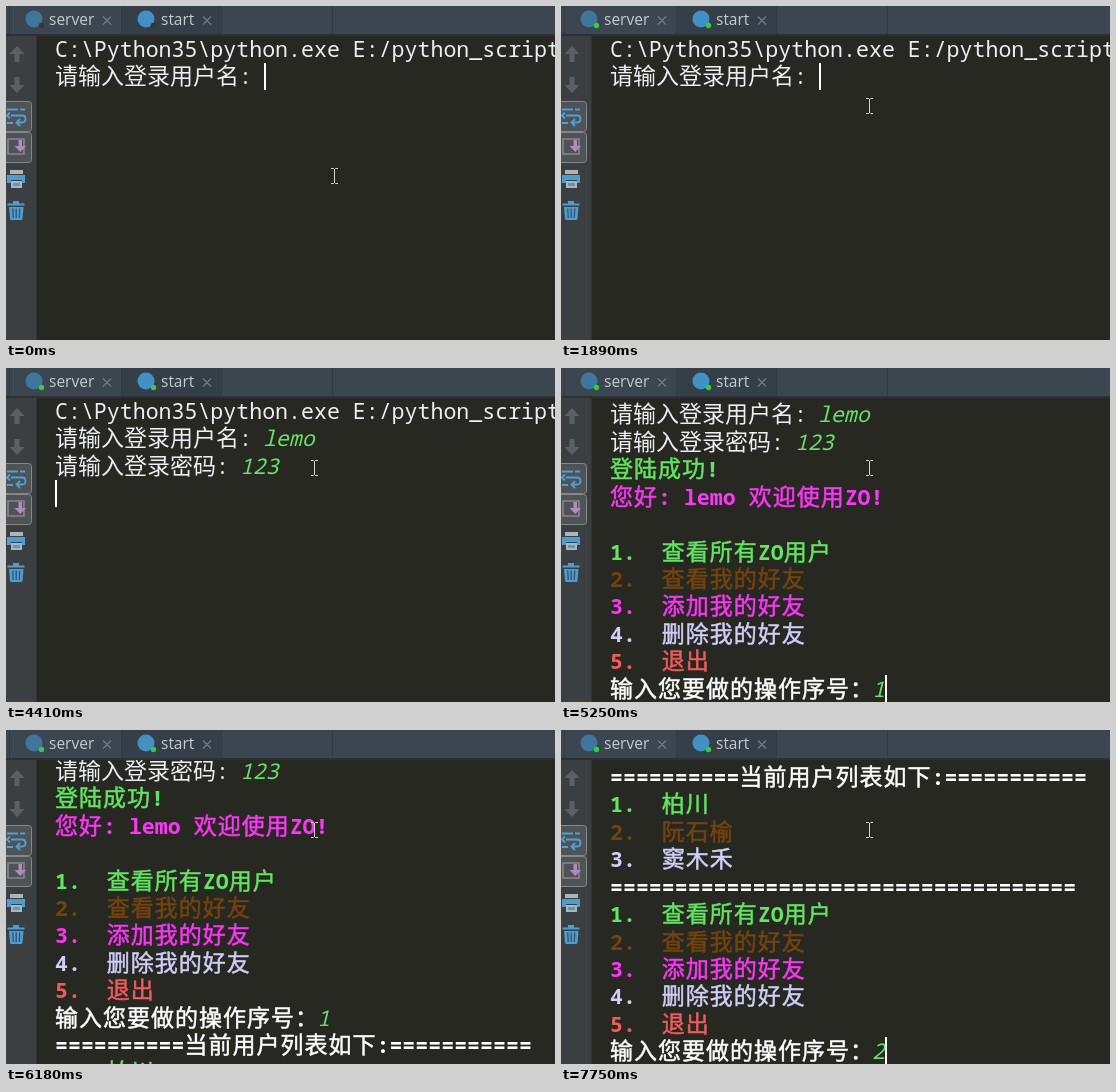
These frames come from a looping animation (549x334 px, 8 s). An HTML page:

```html
<!DOCTYPE html>
<html lang="zh-CN">
<head>
<meta charset="utf-8">
<title>Console session</title>
<style>
  html, body { margin: 0; width: 100%; height: 100%; overflow: hidden; background: #272822; }
  #stage { position: relative; width: 549px; height: 334px; overflow: hidden; background: #272822; }
  #stage svg { position: absolute; left: 0; top: 0; }
  #tabs text { font: 15.5px "Open Sans", "Noto Sans", sans-serif; fill: #c6cbce; }
  #console { position: absolute; left: 31px; top: 30px; right: 0; bottom: 0; overflow: hidden; }
  .page { position: absolute; left: 18px; top: -1px; }
  .line {
    position: absolute; left: 0; height: 27.42px; line-height: 27.42px; white-space: pre;
    font-family: "Noto Sans Mono", "DejaVu Sans Mono", monospace; font-size: 21.58px; color: #eceef4;
  }
  .cjk {
    font-family: "Noto Sans CJK SC", "Noto Sans CJK JP", "Noto Sans CJK", sans-serif;
    font-size: 23px; line-height: 0;
  }
  .bold { font-weight: 700; }
  .bold .cjk { letter-spacing: 1px; font-weight: 400; -webkit-text-stroke: 0.5px; }
  .line i { position: relative; left: -2px; color: #68e068; font-weight: 400; }
  .green { color: #62e562; }
  .brown { color: #74430d; }
  .pink { color: #fb37f6; }
  .lilac { color: #cfcff8; }
  .red { color: #f05c5c; }
  .white { color: #fff; }
  #caret { position: absolute; width: 2px; height: 27px; background: #fff; }
</style>
</head>
<body>
<div id="stage">
  <svg id="tabs" width="549" height="334">
    <rect width="549" height="29" fill="#3b4650"/>
    <rect id="active" y="0" height="28" fill="#343f49"/>
    <path d="M3.5 0V28M115.5 0V28M215.5 0V28M326.5 0V28" stroke="#303a42"/>
    <rect y="28" width="549" height="2" fill="#2b3136"/>
    <g class="icon"><circle cx="28" cy="13" r="8.5" fill="#4390c4"/></g>
    <g class="icon"><circle cx="140" cy="13" r="8.5" fill="#4390c4"/></g>
    <circle class="dot" cx="35.5" cy="19.5" r="2.7"/>
    <circle class="dot" cx="147.5" cy="19.5" r="2.7"/>
    <text x="43" y="19">server</text>
    <text x="155" y="19">start</text>
    <path d="M97 10.5l8 8m0-8l-8 8M197 10.5l8 8m0-8l-8 8" stroke="#73797e" stroke-width="1.3"/>

    <rect y="30" width="30" height="304" fill="#3c3f41"/>
    <rect x="30" y="30" width="1" height="304" fill="#313335"/>
    <g fill="#5d6062">
      <path d="M11 40l7.5 8h-5v8h-5v-8h-5z"/>
      <path d="M11 87l7.5-8h-5v-8h-5v8h-5z"/>
    </g>
    <g fill="#505355" stroke="#85888a">
      <rect x="-3.5" y="95.5" width="29" height="30" rx="3"/>
      <rect x="-3.5" y="126.5" width="29" height="30" rx="3"/>
    </g>
    <g fill="none" stroke="#4fa0d8" stroke-width="1.8">
      <path d="M1 103.5h11M14 103.5h5M5 109.500h11q3.500 0 3.500 3.500t-3.500 3.500h-4M1 117h6"/>
      <path d="M4 106.500l-3 3 3 3M14 113l-3.500 3.500 3.500 3.500"/>
    </g>
    <path d="M2 133h16v15H2z" fill="none" stroke="#85888a" stroke-width="1.6"/>
    <path d="M12.500 134h3.500v6h4l-5.700 6-5.800-6h4z" fill="#b18abf"/>
    <g fill="#4e9dd2">
      <path d="M4 164h13v4H4z" fill="#aeb4b8"/>
      <path d="M1 169h18v8h-3v-3H5v3H1z"/>
      <path d="M5 175h11v7H5z" fill="#aeb4b8"/>
      <path d="M7 177h7v3H7z"/>
      <path d="M1.500 197.500h17v2h-17zM7 195h6v2.500H7zM3 201h14.500l-1 11.500q-.2 1.500-1.500 1.500H5.500q-1.300 0-1.500-1.500z"/>
    </g>
    <path d="M6.800 202.500l.4 9.500M10.200 202.500v9.500M13.700 202.500l-.4 9.500" stroke="#34536a" stroke-width="1.3"/>
  </svg>

  <div id="console">
    <div class="page" id="server"></div>
    <div class="page" id="start"></div>
    <div id="caret"></div>
  </div>

  <svg width="549" height="334">
    <path id="arrow" d="M0 0V16.5L3.8 13 6.500 19 9.300 17.800 6.700 12H12z" fill="#fff" stroke="#222" stroke-width=".8"/>
    <path id="beam" d="M-3-7.500h2.500l1 1 1-1H4M.5-7V7M-3 7.500h2.500l1-1 1 1H4" fill="none" stroke="#d4d4d0"/>
  </svg>
</div>

<script>
const LOOP = 8000, ROW = 27.42;
const $ = id => document.getElementById(id);

const path = ['', 'C:\\Python35\\python.exe E:/python_scripts/chat'];
const menu = [
  ['bold green', '1.  查看所有ZO用户'],
  ['bold brown', '2.  查看我的好友'],
  ['bold pink', '3.  添加我的好友'],
  ['bold lilac', '4.  删除我的好友'],
  ['bold red', '5.  退出']
];
const ask = id => ['bold white', '输入您要做的操作序号：', id];

const startLines = [
  path,
  ['', '请输入登录用户名: ', 'user'],
  ['', '请输入登录密码: ', 'pass'],
  ['bold green', '登陆成功!'],
  ['bold pink', '您好: lemo 欢迎使用ZO!'],
  ['', ''],
  ...menu,
  ask('pick1'),
  ['bold white', '='.repeat(10) + '当前用户列表如下:' + '='.repeat(11)],
  ['bold green', '1.  柏川'],
  ['bold brown', '2.  阮石榆'],
  ['bold lilac', '3.  窦木禾'],
  ['bold white', '='.repeat(36)],
  ...menu,
  ask('pick2')
];

function fill(page, lines) {
  page.innerHTML = lines.map(([cls, text, id], i) => {
    const body = text.replace(/[\u3000-\u9fff\uff00-\uffef]+/g, '<span class="cjk">$&</span>');
    const input = id ? `<i id="${id}"></i>` : '';
    return `<div class="line ${cls}" style="top:${i * ROW}px">${body}${input}</div>`;
  }).join('');
}
fill($('server'), [path, ['bold green', '正在等待对方回复...']]);
fill($('start'), startLines);
const rows = [...$('start').children];

// Each entry changes part of the state; caret is [x, row].
const events = [
  [0, { tab: 1, live: false, rows: 2, scroll: 0, user: '', pass: '', pick1: '', pick2: '', caret: [258, 1] }],
  [745, { tab: 0, live: true, caret: [49, 2] }],
  [1420, { tab: 1, caret: [258, 1] }],
  [2520, { caret: null }],
  [2670, { user: 'l', caret: [271, 1] }],
  [2750, { user: 'le', caret: [283, 1] }],
  [2900, { user: 'lemo', caret: [309, 1] }],
  [3220, { caret: [49, 2] }],
  [3450, { rows: 3, caret: [234, 2] }],
  [3770, { pass: '1', caret: [247, 2] }],
  [3860, { pass: '12', caret: [260, 2] }],
  [4090, { pass: '123', caret: [273, 2] }],
  [4410, { caret: [49, 3] }],
  [4640, { rows: 12, scroll: 24, caret: [49, 11] }],
  [5250, { pick1: '1', caret: [324, 11] }],
  [6030, { scroll: 51.4, caret: [49, 12] }],
  [6180, { rows: 14, scroll: 57, caret: null }],
  [6260, { rows: 23, scroll: 325.3 }],
  [6350, { caret: [49, 22] }],
  [7050, { caret: null }],
  [7510, { caret: [49, 22] }],
  [7750, { pick2: '2', caret: [324, 22] }]
];

// Pointer stops: time, x, y
const stops = [
  [0, 328, 170], [600, 84, 18], [745, 80, 15], [970, 80, 15], [1120, 113, 20],
  [1345, 163, 16], [1420, 163, 16], [1720, 306, 97], [1870, 308, 100]
];

function pointer(t) {
  const q = t < 70 ? 0 : 70 + Math.floor((t - 70) / 75) * 75;
  const n = stops.findIndex(s => s[0] > q);
  if (n < 0) return stops[stops.length - 1].slice(1);
  const [t0, x0, y0] = stops[n - 1], [t1, x1, y1] = stops[n];
  const k = (q - t0) / (t1 - t0);
  return [x0 + (x1 - x0) * k, y0 + (y1 - y0) * k];
}

function render(t) {
  const s = Object.assign({}, ...events.filter(e => e[0] <= t).map(e => e[1]));
  const show = (el, on) => { el.style.display = on ? '' : 'none'; };

  show($('server'), s.tab === 0);
  show($('start'), s.tab === 1);
  $('start').style.transform = `translateY(${-s.scroll}px)`;
  // Rows scrolled almost out of view are dropped.
  rows.forEach((row, i) => show(row, i < s.rows && (i + 0.7) * ROW > s.scroll));
  for (const id of ['user', 'pass', 'pick1', 'pick2']) $(id).textContent = s[id];

  show($('caret'), s.caret);
  if (s.caret) {
    $('caret').style.left = s.caret[0] - 31 + 'px';
    $('caret').style.top = Math.round(s.caret[1] * ROW - s.scroll - 0.6) + 'px';
  }

  $('active').setAttribute('x', s.tab ? 116 : 4);
  $('active').setAttribute('width', s.tab ? 99 : 111);
  document.querySelectorAll('.icon').forEach((el, i) => el.setAttribute('opacity', i === s.tab ? 1 : 0.65));
  document.querySelectorAll('.dot').forEach(el => el.setAttribute('fill', s.live ? '#2fd03c' : '#30383a'));

  const [x, y] = pointer(t).map(Math.round);
  show($('arrow'), y < 29);
  show($('beam'), y >= 29);
  $(y < 29 ? 'arrow' : 'beam').setAttribute('transform', `translate(${x} ${y})`);
}

const began = performance.now();
function tick() {
  render((performance.now() - began) % LOOP);
  requestAnimationFrame(tick);
}
tick();
</script>
</body>
</html>
```
